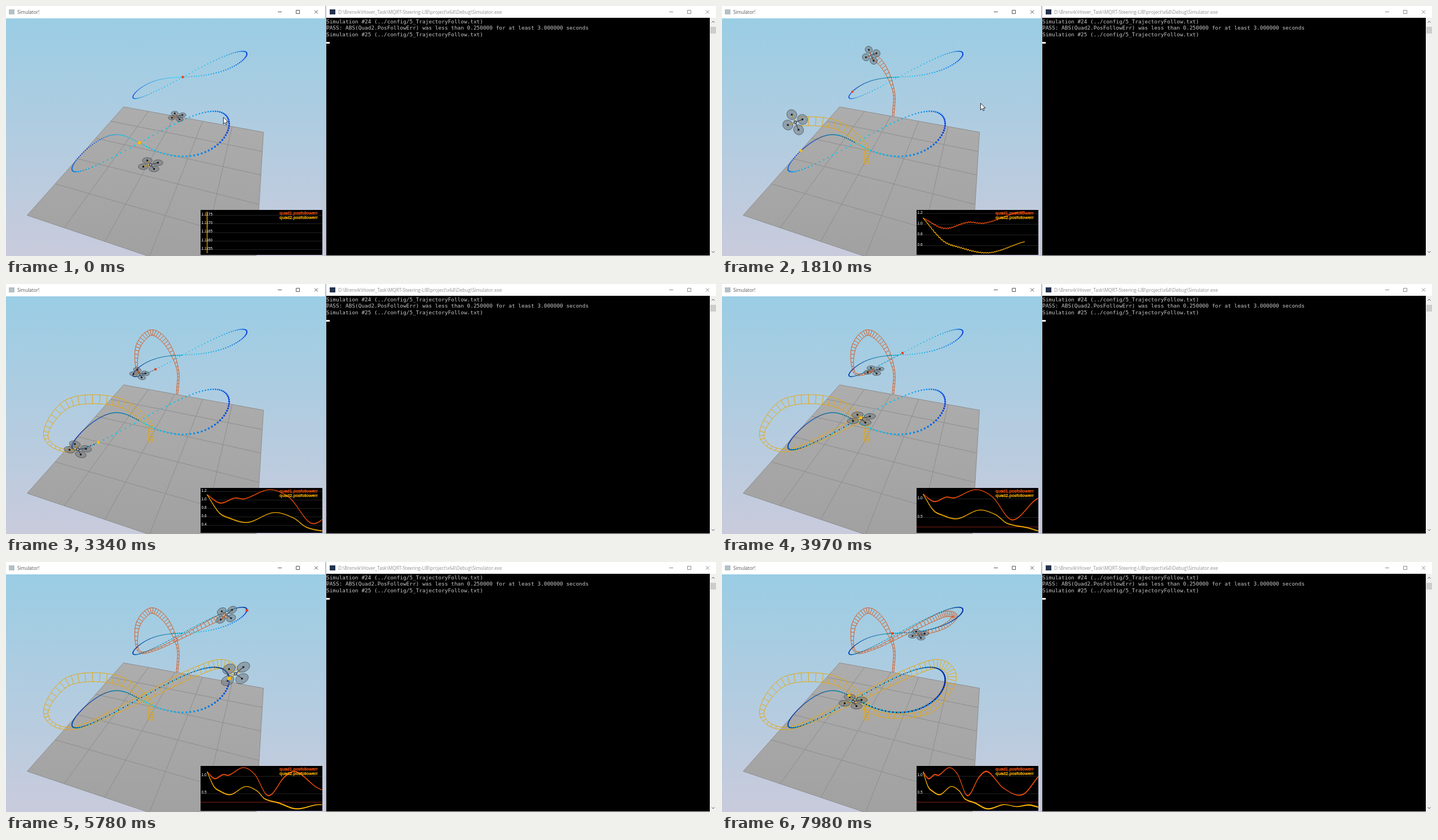
An HTML page with a canvas for the animation above (8000 ms loop, 1259x445 px).

```html
<!DOCTYPE html>
<html lang="en">
<head>
<meta charset="utf-8">
<title>Simulator</title>
<style>
html, body { margin: 0; width: 100%; height: 100%; overflow: hidden; background: #fff; }
#stage { position: relative; width: 1259px; height: 445px; overflow: hidden; }
#stage > * { position: absolute; }
canvas { left: 0; top: 0; }
.title { top: 4px; font: 8.2px/13px "Open Sans", "Noto Sans", sans-serif; white-space: pre; }
.icon { top: 6px; width: 10px; height: 9px; }
#edge { left: 566px; top: 0; width: 2px; height: 445px; background: #b9bfc9; }
#console { left: 568px; top: 21px; width: 680px; height: 423px; background: #000; }
#console pre { margin: 0; position: absolute; left: 0; top: 1px; color: #c8c8c8;
  font: 9.43px/11.3px "DejaVu Sans Mono", "Liberation Mono", monospace; }
#console i { position: absolute; left: 0; top: 43px; width: 6px; height: 3px; background: #fff; }
#bar { left: 1248px; top: 21px; width: 11px; height: 424px; background: #f0f0f0; }
#bar i { position: absolute; left: 1px; top: 16px; width: 10px; height: 12px; background: #cdcdcd; }
#foot { left: 568px; top: 444px; width: 680px; height: 1px; background: #d4d4d4; }
svg { left: 0; top: 0; fill: none; stroke-width: 1; }
</style>
</head>
<body>
<div id="stage">
  <div class="icon" style="left:5px;background:#b4c0c5"></div>
  <div class="title" style="left:20px;color:#555">Simulator!</div>
  <div class="icon" style="left:574px;background:#24324f"></div>
  <div class="title" style="left:589px;color:#909090">D:\Brenvik\Hover_Task\MQRT-Steering-LIB\project\x64\Debug\Simulator.exe</div>
  <div id="edge"></div>
  <div id="console"><pre>Simulation #24 (../config/5_TrajectoryFollow.txt)
PASS: ABS(Quad2.PosFollowErr) was less than 0.250000 for at least 3.000000 seconds
Simulation #25 (../config/5_TrajectoryFollow.txt)</pre><i></i></div>
  <div id="bar"><i></i></div>
  <div id="foot"></div>
  <svg width="1259" height="445">
    <defs><path id="btns" d="M0 10.5h7M32.5 7.5h6v6h-6zM65 7.5l6 6m0-6l-6 6"/></defs>
    <use href="#btns" x="482" stroke="#555"/>
    <use href="#btns" x="1176" stroke="#888"/>
    <path d="M1251.500 29.500l2.500-2.500 2.500 2.500M1251.500 436.500l2.500 2.500 2.500-2.500" stroke="#555"/>
  </svg>
  <canvas id="view" width="1259" height="445"></canvas>
</div>
<script>
const LOOP = 8000, LAP = 7800, LIFTOFF = 70, LEG = 660;
const g = document.getElementById('view').getContext('2d');
const clamp = v => Math.min(1, Math.max(0, v));

// projective map of a plane: origin o, axes a and b, depth change d along them
const plane = (o, a, b, d) => (u, v) => {
  const w = 1 + d[0] * u + d[1] * v;
  return [0, 1].map(i => (o[i] + a[i] * u + b[i] * v) / w).concat(1 / w);
};
const ground = plane([208, 179], [186.8, 15], [-185.4, 48.4], [-.1343, -.3888]);

// a figure eight on a tilted plane
const eight = (...camera) => {
  const map = plane(...camera);
  return t => {
    const a = 2 * Math.PI * t / LAP;
    return map(Math.sin(a), Math.sin(2 * a));
  };
};

// way: position every LEG ms; err: follow error at its turning points
const quads = [{
  course: eight([313, 126], [-53.5, 51], [22, -9.7], [.14, .04]),
  way: [[303, 196], [304, 152], [285, 106], [257, 86], [233, 113], [235, 158], [268, 154],
    [319, 129], [367, 104], [396, 92], [412, 97], [392, 115], [348, 129]],
  err: [[0, 1.1177], [380, .92], [800, 1.035], [1100, 1.02], [1820, 1.235], [2400, 1.04],
    [3080, .43], [3900, .97], [4480, 1.12], [5600, .64], [6900, .46], [8000, .98]],
  size: .72, dot: 1.6, goal: 4, low: 150, rise: 55, width: 5,
  trail: '#d9591f', arm: '#c8601c', mark: '#f03c1e', ink: '#f9500a'
}, {
  course: eight([236, 243], [-75, 77], [53, -3], [.213, .13]),
  way: [[256, 282], [251, 247], [195, 209], [110, 212], [70, 270], [121, 295], [245, 240],
    [326, 199], [384, 181], [407, 208], [369, 263], [291, 273], [232, 248]],
  err: [[0, 1.1177], [340, .7], [600, .575], [1180, .46], [1930, .69], [2500, .57],
    [2900, .34], [3600, .22], [4480, .05], [5600, .17], [6500, .115], [7350, .16], [8000, .1]],
  size: 1, dot: 2.2, goal: 5, low: 295, rise: 90, width: 8,
  trail: '#e6a70c', arm: '#c88a18', mark: '#ffbe00', ink: '#ffb400'
}];

// time and the two arm vectors both drones share
const pose = [
  [0, 13, -3.5, -6, -7.5], [1810, 13, -5, -6, -13.5], [2650, 14, 1, -4, -12.5],
  [3970, 15, -4, -7, -7], [5780, 14, -12, -11.5, -8.5], [7040, 18, -3, -13, .8],
  [7980, 15, -3, -6, -8]
];

// cubic Hermite through rows of [time, ...values]
function at(rows, t) {
  const n = rows.length - 1;
  let i = 0;
  while (i < n - 1 && rows[i + 1][0] < t) i++;
  const p = rows[i], q = rows[i + 1], d = q[0] - p[0];
  const u = clamp((t - p[0]) / d), v = 1 - u;
  const slope = (j, c) => {
    const a = rows[Math.max(j - 1, 0)], b = rows[Math.min(j + 1, n)];
    return (b[c] - a[c]) / (b[0] - a[0]);
  };
  return p.slice(1).map((y, k) => {
    const c = k + 1;
    return y * (1 + 2 * u) * v * v + q[c] * u * u * (3 - 2 * u)
      + d * u * v * (slope(i, c) * v - slope(i + 1, c) * u);
  });
}

function line(points, close) {
  g.beginPath();
  points.forEach(p => g.lineTo(p[0], p[1]));
  if (close) g.closePath();
}

function square(x, y, size, color) {
  g.fillStyle = color;
  g.fillRect(x - size / 2, y - size / 2, size, size);
}

function shade(y0, y1, from, to) {
  const s = g.createLinearGradient(0, y0, 0, y1);
  s.addColorStop(0, from);
  s.addColorStop(1, to);
  return s;
}
const sky = shade(22, 445, '#9acde4', '#c9cbdc');
const slab = shade(180, 445, '#adadad', '#a1a1a1');

function drawWorld() {
  g.fillStyle = sky;
  g.fillRect(-1, 21, 568, 425);
  line([ground(0, 0), ground(1, 0), ground(1, 1), ground(0, 1)], true);
  g.fillStyle = slab;
  g.fill();
  g.strokeStyle = '#8d8d8d';
  g.lineWidth = 1;
  for (let k = 0; k <= 1; k += .2) {
    line([ground(k, 0), ground(k, 1)]);
    g.stroke();
    line([ground(0, k), ground(1, k)]);
    g.stroke();
  }
}

// blue where the course is slow, cyan where it is fast; dark beads once flown
function drawCourse(q, t) {
  const step = LAP / 130;
  for (let s = 0; s < LAP; s += step) {
    const fast = Math.abs(Math.cos(2 * Math.PI * s / LAP)) ** 1.3;
    const [x, y, near] = q.course(s);
    square(x, y, q.dot * near, `rgb(0,${50 + 155 * fast | 0},${225 + 15 * fast | 0})`);
    if (s + step / 2 > t) continue;
    const [mx, my, mnear] = q.course(s + step / 2);
    square(mx, my, q.dot * .75 * mnear, '#0a1428');
  }
}

// ribbon across the flight path, wider the higher it climbs
function drawTrail(q, t) {
  const a = [], b = [];
  const add = s => {
    const [x, y] = at(q.path, s), [px, py] = at(q.path, s - 15), [nx, ny] = at(q.path, s + 15);
    const k = q.width * (.3 + .7 * clamp((q.low - y) / q.rise)) / (Math.hypot(nx - px, ny - py) || 1);
    const ox = (ny - py) * k, oy = (px - nx) * k;
    a.push([x + ox, y + oy]);
    b.push([x - ox, y - oy]);
  };
  for (let s = 20; s < t; s += 45) add(s);
  g.strokeStyle = q.trail;
  g.lineWidth = 1;
  [a, b].forEach(rail => { line(rail); g.stroke(); });
  g.beginPath();
  for (let i = 0; i < a.length; i += 2) {
    g.moveTo(...a[i]);
    g.lineTo(...b[i]);
  }
  g.stroke();
}

function drawDrone(q, t) {
  const [x, y] = at(q.path, t);
  const [ax, ay, bx, by] = at(pose, t).map(v => v * q.size);
  const ends = [[ax, ay, '#4d4a55'], [-bx, -by, '#4d4a55'], [bx, by, q.arm], [-ax, -ay, q.arm]];
  ends.forEach(([ex, ey]) => {
    g.save();
    g.transform(ax, ay, bx, by, x + ex, y + ey);
    g.beginPath();
    g.arc(0, 0, .62, 0, 7);
    g.restore();
    g.fillStyle = 'rgba(110,115,120,.5)';
    g.fill();
    g.strokeStyle = 'rgba(55,58,62,.8)';
    g.lineWidth = .8;
    g.stroke();
  });
  ends.forEach(([ex, ey, arm]) => {
    line([[x, y], [x + ex, y + ey]]);
    g.strokeStyle = arm;
    g.lineWidth = 1.3;
    g.stroke();
    square(x + ex, y + ey, 2 + q.size, '#15171a');
  });
  square(x, y, 5 * q.size, '#2e3a4c');
  square(x, y, 2.5 * q.size, '#c3cbd2');
}

const TICK = 8;
const sample = (q, t) => {
  const ripple = .012 * clamp(t / 200) * Math.abs(Math.cos(Math.PI * t / 4000));
  return at(q.err, t)[0] + ripple * Math.sin(2 * Math.PI * t / 42);
};

quads.forEach(q => {
  q.path = q.way.map((p, i) => [i * LEG, ...p]);
  q.log = Array.from({ length: LOOP / TICK + 1 }, (_, i) => [i * TICK, sample(q, i * TICK)]);
});

// finest 1-2-5 step that gives at most five gaps
function tickStep(range) {
  for (let digits = 4; digits >= 0; digits--) {
    const step = [1, 2, 5].map(m => m / 10 ** digits).find(s => range / s <= 5.5);
    if (step) return [step, digits];
  }
  return [1, 0];
}

function drawChart(time) {
  const t = time + 2;
  const runs = quads.map(q => [...q.log.slice(0, Math.floor(t / TICK) + 1), [t, sample(q, t)]]);
  const all = runs.flat().map(p => p[1]);
  const lo = Math.min(...all), hi = Math.max(...all);
  const px = s => 356.5 + s * 204 / Math.max(2050, t);
  const py = v => 440 - (v - lo) / (hi - lo) * 74;
  const rule = (v, color) => {
    g.fillStyle = color;
    g.fillRect(345, Math.round(py(v)), 216, 1);
  };

  g.save();
  g.beginPath();
  g.rect(345, 363, 216, 80);
  g.clip();
  g.fillStyle = '#000';
  g.fillRect(345, 363, 216, 80);
  g.font = '6.6px "Liberation Sans", Arial, sans-serif';
  const [step, digits] = tickStep(hi - lo);
  for (let k = Math.ceil(lo / step); k * step <= hi; k++) {
    rule(k * step, '#222');
    g.fillStyle = '#fff';
    g.fillText((k * step).toFixed(digits), 346.5, py(k * step) + .8);
  }
  if (lo < .25) rule(.25, '#7d2015');
  g.lineJoin = 'round';
  quads.forEach((q, k) => {
    line(runs[k].map(p => [px(p[0]), py(p[1])]));
    g.strokeStyle = q.ink;
    g.lineWidth = 1.2;
    g.stroke();
  });
  g.font = '8px "Liberation Sans", Arial, sans-serif';
  g.lineWidth = .35;
  quads.forEach((q, k) => {
    const label = [`quad${k + 1}.posfollowerr`, 485, 370.5 + 8.5 * k];
    g.fillStyle = g.strokeStyle = q.ink;
    g.fillText(...label);
    g.strokeText(...label);
  });
  g.restore();
}

// the pointer drifts right, then leaves past the lower right corner
function drawMouse(t) {
  const drift = clamp((t - 900) / 600), dash = clamp((t - 2470) / 180), exit = clamp((t - 2650) / 200);
  const x = 385.5 + 73 * drift + 654 * dash + 93 * exit;
  const y = 198 - 25 * drift + 121 * dash + 156 * exit;
  const shape = [[0, 0], [0, 12], [2.8, 9.4], [4.6, 13.4], [6.5, 12.6], [4.8, 8.7], [8.4, 8.5]];
  line(shape.map(p => [x + p[0], y + p[1]]), true);
  g.fillStyle = '#fff';
  g.fill();
  g.strokeStyle = '#111';
  g.lineWidth = .9;
  g.stroke();
}

function draw(clock) {
  const t = clock < LIFTOFF ? 0 : clock;
  g.clearRect(0, 0, 1259, 445);
  g.save();
  g.beginPath();
  g.rect(0, 22, 566, 423);
  g.clip();
  g.translate(.5, .5);
  drawWorld();
  quads.forEach(q => drawTrail(q, t));
  quads.forEach(q => drawCourse(q, t));
  quads.forEach(q => drawDrone(q, t));
  quads.forEach(q => {
    const [x, y, near] = q.course(t);
    square(x, y, q.goal * near, q.mark);
  });
  g.restore();
  drawChart(t);
  drawMouse(t);
}

const start = performance.now();
function tick() {
  draw((performance.now() - start) % LOOP);
  requestAnimationFrame(tick);
}
tick();
</script>
</body>
</html>
```
